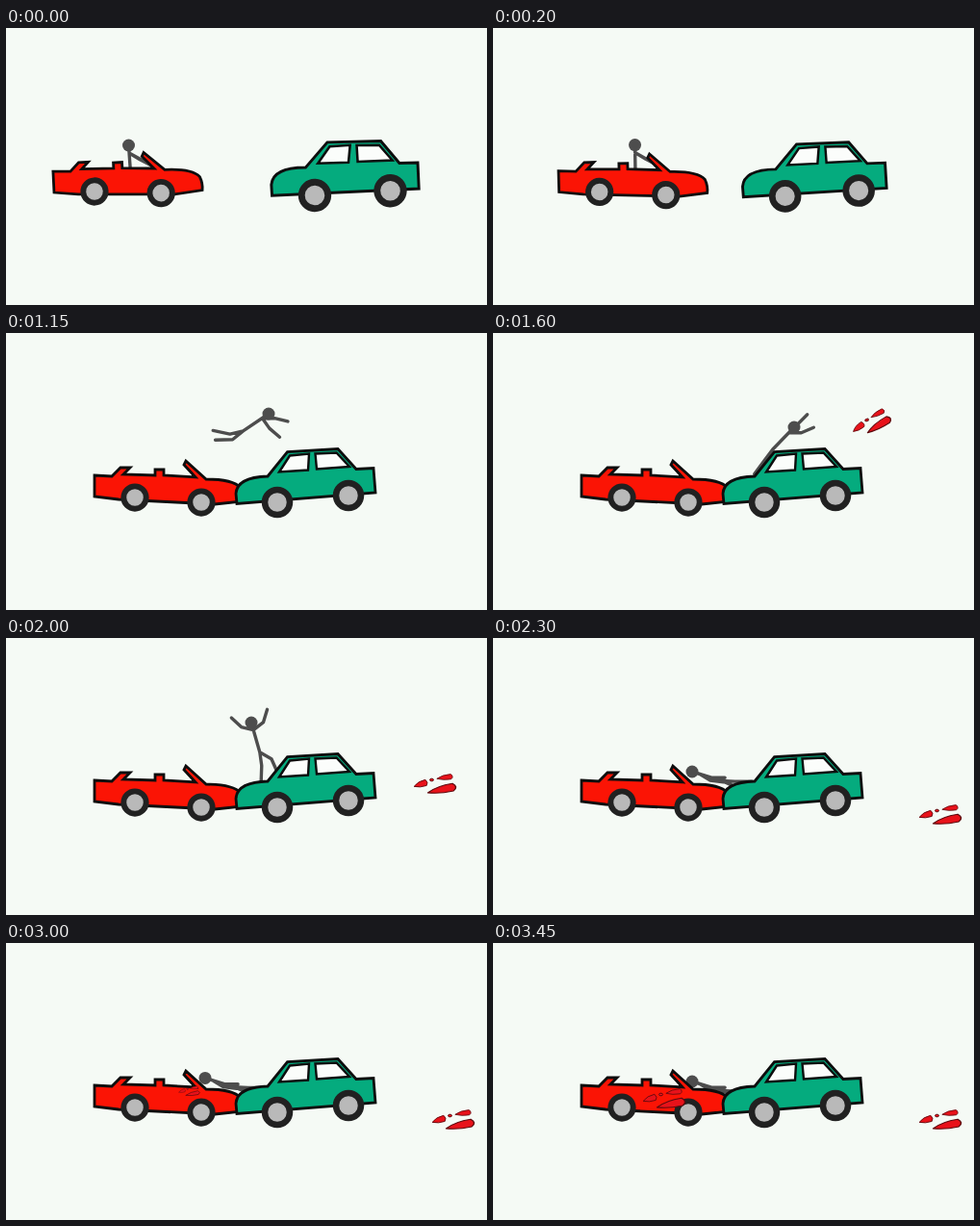
An HTML page for the animation above (3600 ms loop, 500 px wide and 288 px high).

```html
<!DOCTYPE html>
<html lang="en">
<head>
<meta charset="utf-8">
<title>Car crash</title>
<style>
html, body { margin: 0; width: 100%; height: 100%; overflow: hidden; background: #f5faf5; }
svg { display: block; width: 100vw; height: 100vh; }
.body { stroke: #0d0d0d; stroke-width: 2.8; }
.glass { fill: #fbfdfb; stroke: #0d0d0d; stroke-width: 2.4; }
.man path { fill: none; stroke: #4d4d4d; stroke-width: 3.4; stroke-linecap: round; stroke-linejoin: round; }
.man circle { fill: #4d4d4d; }
.drops { fill: #e8121a; stroke: #5c0a0e; stroke-width: 1; stroke-linejoin: round; }
</style>
</head>
<body>
<svg viewBox="0 0 500 288">
  <defs>
    <circle id="wheel" r="13" fill="#b9b9b9" stroke="#212121" stroke-width="6.5"/>
    <path id="drop" d="M-10 1Q-3-4 8-4Q12 0 8 3Q-2 4-10 1Z"/>
    <g id="drops" class="drops">
      <use href="#drop" transform="translate(6 5.5) rotate(-9) scale(1.48 1.1)"/>
      <use href="#drop" transform="translate(-16 0) rotate(-12) scale(.72 .9)"/>
      <use href="#drop" transform="translate(9 -7) rotate(-4) scale(.82 .75)"/>
      <ellipse cx="-4.5" cy="-4.5" rx="2" ry="1.3"/>
    </g>
    <path id="star"/>
  </defs>
  <g class="man" id="man"><path/><circle r="6.5"/></g>
  <g id="red">
    <path class="body" fill="#fb1405" d="M92 148L110 149L119 140H129L122 147L155 148V142H164V148L197 150L185 137L187 133L208 152Q236 152 244 161Q247 168 246 175L217 178L117 173L92 170Z"/>
    <use href="#wheel" transform="translate(134 171) scale(.9)"/>
    <use href="#wheel" transform="translate(203 176) scale(.9)"/>
  </g>
  <g id="green">
    <path class="body" fill="#05ab7e" d="M240 177.5L239 167Q240 150 272 149L292.5 123.5L345 120.5L364 141.5L382 140.5L384 166Z"/>
    <path class="glass" d="M284 144.5L295 127.5L315 125.5L314 142.5ZM321.5 125.5L343.5 124.5L357 139L323 141.5Z"/>
    <use href="#wheel" x="282" y="176"/>
    <use href="#wheel" x="356" y="169"/>
  </g>
  <g id="bang">
    <use href="#star" fill="#f2760c" stroke="#f8281c" stroke-width="3"/>
    <use href="#star" fill="#fbd116" transform="translate(-2 -1) scale(.34)"/>
  </g>
  <use id="spray" href="#drops"/>
  <use id="stain" href="#drops"/>
</svg>
<script>
const LOOP = 3600, STEP = 50, LAST = 3450;
const el = id => document.getElementById(id);
const mix = (a, b, k) => a + (b - a) * k;
const ramp = (t, a, b) => Math.min(1, Math.max(0, (t - a) / (b - a)));
const ease = k => k * k * (3 - 2 * k);
const hump = k => Math.sin(Math.PI * k);
const polar = ([x, y], deg, r) => {
  const a = deg * Math.PI / 180;
  return [x + r * Math.cos(a), y + r * Math.sin(a)];
};

// Head position, then limb directions in degrees; gap and split part the pairs
const drive = { x: 127.5, y: 122, spine: 86, arm: 30, gap: 1, elbow: -3, leg: 15, split: 0, knee: 40 };
const lean = { ...drive, x: 179, y: 121, spine: 94 };
const fly = { x: 273, y: 84, spine: 146, arm: 28, gap: 27, elbow: -1, leg: 154, split: -13, knee: 31 };
const hit = { x: 313, y: 98, spine: 134, arm: -22, gap: 22, elbow: -12, leg: 126, split: 1, knee: 0 };
const stand = { x: 255, y: 88, spine: 74, arm: -102, gap: 64, elbow: -3, leg: 56, split: -26, knee: 23 };
const lie = { x: 207, y: 139, spine: 17, arm: 24, gap: 7, elbow: -20, leg: 13, split: 10, knee: -8 };
const rest = { ...lie, y: 144 };

const poses = [
  [0, drive], [470, lean], [560, lean], [1150, fly], [1400, hit], [1600, hit],
  [1850, stand], [2020, stand], [2250, lie], [2750, lie], [3450, rest]
];
const flight = [
  [1300, { x: 318, y: 92 }], [1600, { x: 394, y: 93 }],
  [2000, { x: 447, y: 152 }], [2200, { x: 466, y: 184 }]
];

function track(keys, t, curve = k => k) {
  let i = 0;
  while (i < keys.length - 2 && t >= keys[i + 1][0]) i++;
  const [t0, a] = keys[i], [t1, b] = keys[i + 1];
  const k = curve(ramp(t, t0, t1)), out = {};
  for (const name in a) out[name] = mix(a[name], b[name], k);
  return out;
}

function place(id, x, y, turn, size) {
  el(id).setAttribute("transform", `translate(${x} ${y}) rotate(${turn}) scale(${size})`);
}

// Moves a car from its offset start to rest, turning about one wheel
function drawCar(id, px, py, dx, dy, turn, size, away) {
  el(id).setAttribute("transform",
    `translate(${px + dx * away} ${py + dy * away}) rotate(${turn * away}) ` +
    `scale(${mix(1, size, away)}) translate(${-px} ${-py})`);
}

function show(id, on) {
  el(id).style.display = on ? "" : "none";
}

function limb(from, angle, bend, spread, upper, lower) {
  return [-1, 1].map(side => {
    const joint = polar(from, angle + side * spread, upper);
    const end = polar(joint, angle + bend + side * spread / 2, lower);
    return `M${from}L${joint}L${end}`;
  }).join("");
}

function drawMan(t) {
  const p = track(poses, t, t > 560 && t < 1150 ? undefined : ease);
  const lift = 10 * hump(ramp(t, 560, 1150)) + 5 * hump(ramp(t, 1150, 1400));
  const head = [p.x, p.y - lift];
  const neck = polar(head, p.spine, 8), hip = polar(head, p.spine, 32);
  const [line, disc] = el("man").children;
  line.setAttribute("d", `M${head}L${hip}` +
    limb(neck, p.arm, p.elbow, p.gap, 13, 14) +
    limb(hip, p.leg, p.knee, p.split, 14, 18));
  disc.setAttribute("cx", head[0]);
  disc.setAttribute("cy", head[1]);
}

function draw(t) {
  const away = 1 - ramp(t, 0, 450);
  drawCar("red", 134, 171, -42, -1, -2.8, 1, away);
  drawCar("green", 282, 176, 39, -2, 1.9, 1.058, away);
  drawMan(t);

  show("bang", t >= 450 && t < 700);
  place("bang", 239, 162, 0, Math.min(ramp(t, 400, 500), 1 - ramp(t, 560, 700)));

  const { x, y } = track(flight, t);
  show("spray", t > 1300);
  place("spray", x, y, -20 * (1 - ramp(t, 1600, 2000)), ramp(t, 1280, 1620));

  const s = ease(ramp(t, 2800, 3200));
  show("stain", s > 0);
  place("stain", mix(203, 179, s), mix(146, 162, s), 0, s);
}

function tick(now) {
  const t = now % LOOP;
  draw(Math.min(LAST, Math.floor(t / STEP) * STEP));
  requestAnimationFrame(tick);
}

const tips = Array.from({ length: 10 }, (_, i) => polar([0, 0], -100 + 36 * i, i % 2 ? 13 : 28));
el("star").setAttribute("d", `M${tips.join("L")}Z`);
draw(0);
requestAnimationFrame(tick);
</script>
</body>
</html>
```
